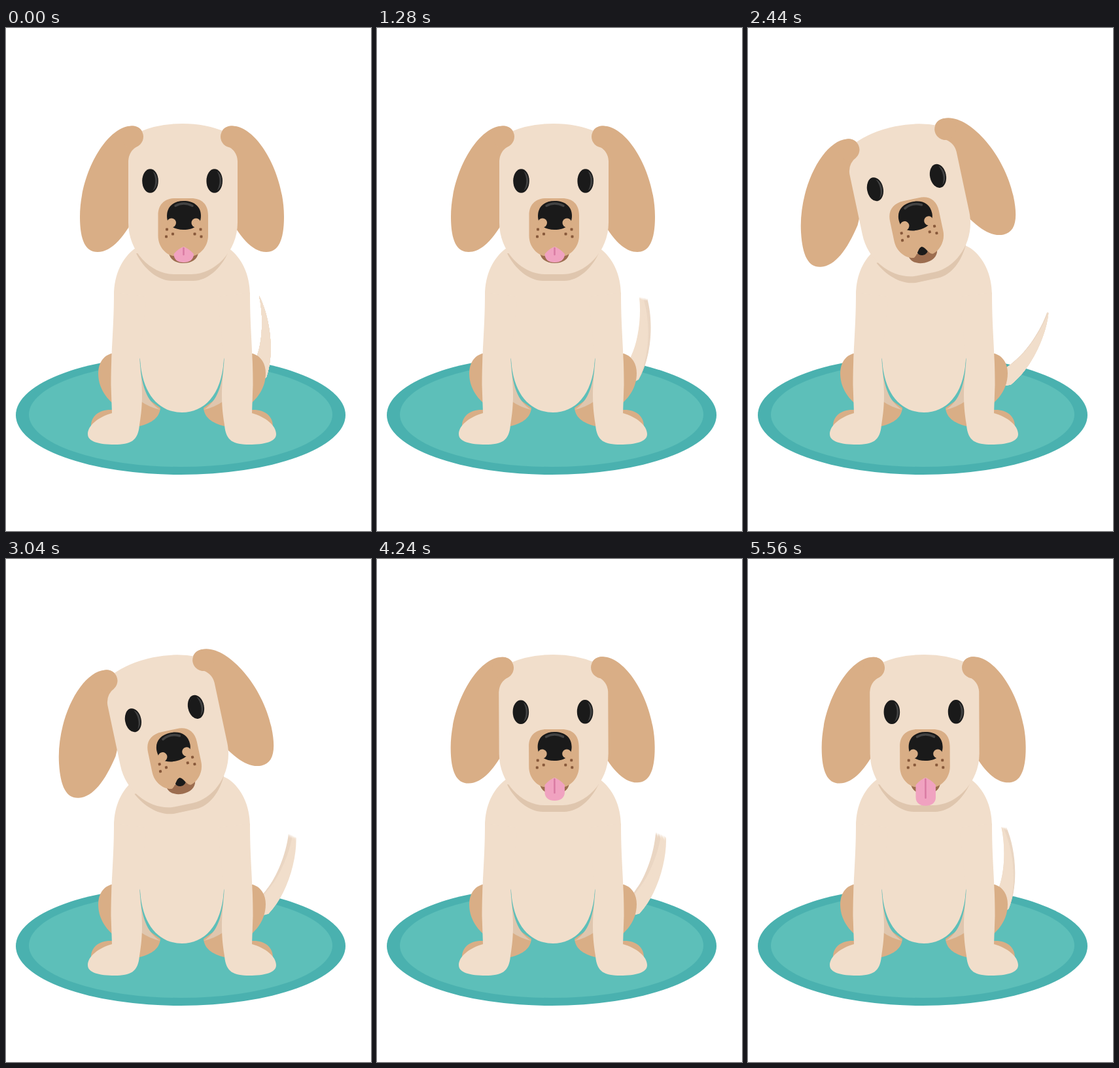
An HTML page for the animation above (5.6 s loop, 558 by 768 pixels).

```html
<!DOCTYPE html>
<html lang="en">
<head>
<meta charset="utf-8">
<title>Puppy</title>
<style>
  html, body { margin: 0; width: 100%; height: 100%; overflow: hidden; background: #fff; }
  svg { display: block; width: 100vw; height: 100vh; }
  .fur { fill: #f1decb; }
  .tan { fill: #d9ae86; }
  .shade { fill: #dfc6ae; }
  .dark { fill: #1a1a1a; }
  .gleam { fill: #434343; }
</style>
</head>
<body>
<svg viewBox="0 0 558 768">
  <defs>
    <path id="tailShape" d="M387 409C402 438 412 492 398 533L378 550L368 535Q380 515 384 500C392 478 394 440 387 409Z"/>
    <path id="ear" class="tan" d="M192 149.500C155 149.500 113 220 113 288C113 325 122 342 140 342C162 342 182 318 200 282L225 200L210 166C210 156 203 149.500 192 149.500Z"/>
    <circle id="lobe" class="tan" cx="193.500" cy="166" r="16.500"/>
    <path id="haunch" class="tan" d="M168 496C149 497 141 512 141 527C141 548 152 563 162 572V583C143 582 130 592 130 608L204 608C224 603 235 594 236 580L208 560Z"/>
    <g id="leg">
      <path class="shade" d="M204.500 506C206 542 214 570 236 583Q219 579 206 570Z"/>
      <path class="fur" d="M165 404C165 460 160.500 490 160.500 545L162 588C141 594 125 607 125 620C125 632 143 636 166 636C190 636 202 631 204 606C207 588 208 575 208 560C208 538 205 525 204.500 504L215 410Z"/>
    </g>
    <g id="eye">
      <ellipse class="dark" rx="12.300" ry="18.300"/>
      <path class="gleam" d="M4 -14.500C13 -9 13 9 4 14.500C9 6 9 -6 4 -14.500Z"/>
    </g>
    <g id="freckles" fill="#87583a">
      <rect x="244" y="305.500" width="4" height="4" rx="1"/>
      <rect x="253" y="312.500" width="4" height="4" rx="1"/>
      <rect x="243" y="316.500" width="4" height="4" rx="1"/>
    </g>
  </defs>

  <ellipse cx="267" cy="591" rx="252" ry="91" fill="#4ab1af"/>
  <ellipse cx="267" cy="590" rx="232" ry="80" fill="#5dbfb9"/>
  <g id="tail"></g>

  <use href="#haunch"/>
  <use href="#haunch" transform="matrix(-1 0 0 1 538 0)"/>
  <path class="fur" d="M165 408C165 376 178 350 198 336L225 322H313L340 336C360 350 373 376 373 408L333 506C330 560 303 587 269 587C235 587 208 560 205 506Z"/>
  <use href="#leg"/>
  <use href="#leg" transform="matrix(-1 0 0 1 538 0)"/>

  <g id="head">
    <path class="shade" d="M199 344C211 368 232 386 254 386H286C308 386 328 367 339 344Z"/>
    <use id="earLeft" href="#ear"/>
    <use href="#ear" transform="matrix(-1 0 0 1 538 0)"/>
    <path class="fur" d="M187 203Q188 187 202 180L203 159Q232 146 270 146Q306 146 336 159L338 180Q353 187 354 203V297C354 342 318 376 284 376H257C222 376 187 342 187 297Z"/>
    <use href="#lobe"/>
    <use href="#lobe" transform="matrix(-1 0 0 1 538 0)"/>
    <use id="eyeLeft" href="#eye"/>
    <use id="eyeRight" href="#eye"/>
    <path fill="#9c6d4f" d="M249 343H294C293 353 284 359 271.500 359C259 359 250 353 249 343Z"/>
    <ellipse id="throat" class="dark" cx="271.500" cy="340" rx="8.500" ry="7"/>
    <path class="tan" d="M232.500 286C232.500 269 243 260 259 260H283C299 260 309 269 309 286V317C309 333 298 345 287 348C280 349 278 335 271.500 334C265 335 262 349 255 348C243 345 232.500 333 232.500 317Z"/>
    <path id="tongue" fill="#f0a2c0"/>
    <path id="crease" stroke="#d97ba3" stroke-width="2.500" stroke-linecap="round"/>
    <path class="dark" d="M246 287C246 272 257 264 271.500 264C287 264 298 272 298 287C298 301 287 308 271.500 308C256 308 246 301 246 287Z"/>
    <path d="M259 271.500Q271.500 264.500 285 271.500" fill="none" stroke="#434343" stroke-width="3.500" stroke-linecap="round"/>
    <circle class="tan" cx="253" cy="297.500" r="7"/>
    <circle class="tan" cx="290.500" cy="297.500" r="7"/>
    <use href="#freckles"/>
    <use href="#freckles" transform="matrix(-1 0 0 1 543.500 0)"/>
  </g>
</svg>
<script>
const LOOP = 5600, STEP = 40, BLUR = 12;
const $ = id => document.getElementById(id);
const set = (id, name, value) => $(id).setAttribute(name, value);
const clamp = x => Math.min(1, Math.max(0, x));

const ease = (t, start, length) => {
  const u = clamp((t - start) / length);
  return u < 0.5 ? 4 * u ** 3 : 1 - 4 * (1 - u) ** 3;
};

// Wag cycles completed at each time; the wag grows faster near the end.
const wagKeys = [[0, 0], [1280, 1.861], [1920, 2.775], [3040, 4.336], [3800, 5.53], [4840, 7.414], [5600, 9.07]];

function wagAngle(t) {
  const i = Math.max(1, wagKeys.findIndex(k => k[0] >= t));
  const [t0, c0] = wagKeys[i - 1], [t1, c1] = wagKeys[i];
  const cycles = c0 + (c1 - c0) * (t - t0) / (t1 - t0);
  return 16.4 * (1 - Math.cos(2 * Math.PI * cycles));
}

// The tail smears over one step: the older half is darker.
const smear = Array.from({ length: BLUR + 1 }, (_, i) => {
  const copy = document.createElementNS("http://www.w3.org/2000/svg", "use");
  copy.setAttribute("href", "#tailShape");
  copy.setAttribute("fill", i < BLUR / 2 ? "#ead6c3" : "#f1decb");
  $("tail").append(copy);
  return copy;
});

function drawTail(t) {
  smear.forEach((copy, i) => {
    const when = Math.max(0, t - STEP * (1 - i / BLUR));
    copy.setAttribute("transform", `rotate(${wagAngle(when)} 380 545)`);
  });
}

function drawMouth(t, hidden) {
  const pant = (1 - Math.cos(2 * Math.PI * t / 320)) / 2;
  const bottom = 358 + 22 * pant;
  const shoulder = bottom - 13;
  set("tongue", "d", `M271.5 334Q263 337 256.500 345V${shoulder}C256.500 ${bottom - 4} 263 ${bottom} 271.5 ${bottom}C280 ${bottom} 287 ${bottom - 4} 287 ${shoulder}V345Q280 337 271.5 334Z`);
  set("crease", "d", `M271.5 336V${bottom - 12}`);
  const show = `translate(0 ${334 * hidden}) scale(1 ${1 - hidden})`;
  for (const id of ["tongue", "crease"]) {
    set(id, "transform", show);
    set(id, "visibility", hidden > 0.85 ? "hidden" : "visible");
  }
  set("throat", "ry", 7 * hidden);
}

function drawEyes(t) {
  const closed = Math.sin(Math.PI * clamp((t - 2800) / 240));
  const open = 1 - 0.92 * closed;
  set("eyeLeft", "transform", `translate(220.5 233.5) scale(1 ${open})`);
  set("eyeRight", "transform", `translate(318.700 233.5) scale(1 ${open})`);
}

function draw(time) {
  const t = Math.floor((time % LOOP) / STEP) * STEP;
  const back = ease(t, 3840, 225);
  const tilt = ease(t, 1760, 225) - 0.977 * back;
  const flop = ease(t, 1840, 300) - ease(t, 3860, 300);
  set("head", "transform", `rotate(${-12 * tilt} 268 364)`);
  set("earLeft", "transform", `rotate(${8.5 * flop} 193.5 166)`);
  drawTail(t);
  drawMouth(t, back === 1 ? 0 : tilt);
  drawEyes(t);
}

const begin = performance.now();
function tick() {
  draw(performance.now() - begin);
  requestAnimationFrame(tick);
}
tick();
</script>
</body>
</html>
```
